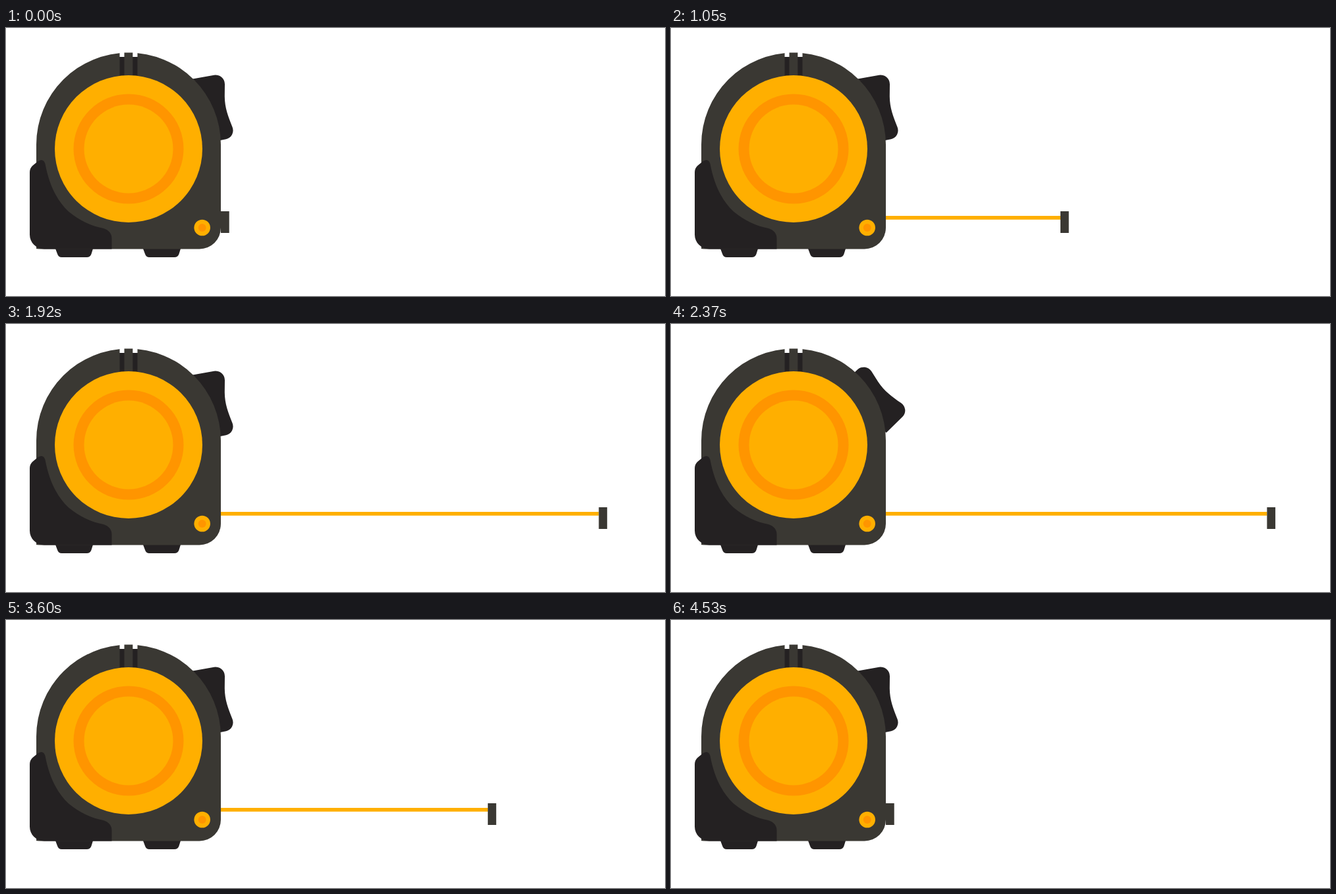
Animation of 1000x408 px, one loop 4.56 s. Source, as an HTML page:

```html
<!DOCTYPE html>
<html lang="en">
<head>
<meta charset="utf-8">
<title>Tape measure</title>
<style>
  html, body { margin: 0; width: 100%; height: 100%; overflow: hidden; background: #fff; }
  svg { display: block; width: 100%; height: 100%; }
  .body { fill: #3a3833; }
  .grip { fill: #242122; }
  .gold { fill: #ffaf00; }
  .ring { fill: #ff9500; }
</style>
</head>
<body>
<svg viewBox="0 0 1000 408">
  <g id="tool">
    <path id="lever" class="grip" d="M275 79L315.6 71.7A14 14 0 0 1 332 85.5L331.8 104C332 122 337 134 343.4 150.5A13.5 13.5 0 0 1 333.8 169.2L300 176Z"/>
    <rect id="tape" class="gold" x="320" y="286" height="5.7"/>
    <rect id="hook" class="body" y="279" width="12.7" height="33"/>
    <path id="foot" class="grip" d="M75 336H132L129.5 344Q128 349 122.5 349H84.500Q79.500 349 78 344Z"/>
    <use href="#foot" x="133"/>
    <path class="body" d="M46 336V177.500A140 140 0 0 1 326 177.500V304A32.500 32.500 0 0 1 293.500 336.500H46Z"/>
    <path fill="#fff" d="M172.500 34H199.500V44H172.500Z"/>
    <path class="grip" d="M172.500 44H199.500V80H172.500Z"/>
    <path class="body" d="M179.500 37.500H192.300V80H179.500Z"/>
    <path fill="#fff" d="M40 337V344H30V204L46 190V204L36 212V320Q36 337 53 337Z"/>
    <path class="grip" d="M36 220Q36 213 41 209L49 202.500Q57 198 59.500 207C65 237 77 263 95 279.500C111 293 131 302 148 305Q160.500 309 160.500 321V336.500H58A22 22 0 0 1 36 314.500Z"/>
    <circle class="gold" cx="186" cy="184" r="112"/>
    <circle class="ring" cx="186" cy="184" r="83.500"/>
    <circle class="gold" cx="186" cy="184" r="67.500"/>
    <circle class="gold" cx="297.700" cy="304" r="12.300"/>
    <circle class="ring" cx="297.700" cy="304" r="6"/>
  </g>
</svg>
<script>
const LOOP = 4560, HOME = 326, REACH = 578.4;
const [tool, lever, tape, hook] =
  ['tool', 'lever', 'tape', 'hook'].map(id => document.getElementById(id));

const span = (t, from, to) => Math.min(1, Math.max(0, (t - from) / (to - from)));
const smooth = p => p * p * (3 - 2 * p);

// cubic-bezier(1/3, 0, 5/6, 1), solved by bisection
function glide(x) {
  let lo = 0, hi = 1;
  for (let i = 0; i < 30; i++) {
    const s = (lo + hi) / 2, r = 1 - s;
    if (s * r * r + 2.5 * s * s * r + s ** 3 < x) lo = s; else hi = s;
  }
  return smooth(lo);
}

function draw(t) {
  const out = t < 2500 ? glide(span(t, 0, 1980)) : 1 - span(t, 3300, 3850) ** 2;
  const x = HOME + REACH * out;
  hook.setAttribute('x', x);
  tape.setAttribute('width', x - 320);

  const press = smooth(span(t, 1980, 2160)) - smooth(span(t, 3240, 3420));
  lever.setAttribute('transform', `rotate(${-33 * press} 295.4 125.7)`);

  const kick = 1 - (1 - span(t, 3840, 3930)) ** 2;
  const tilt = 4 * kick * (1 - smooth(span(t, 3930, 4200)));
  tool.setAttribute('transform', `rotate(${tilt} 180 195)`);
}

const start = performance.now();
function tick() {
  draw((performance.now() - start) % LOOP);
  requestAnimationFrame(tick);
}
draw(0);
requestAnimationFrame(tick);
</script>
</body>
</html>
```
